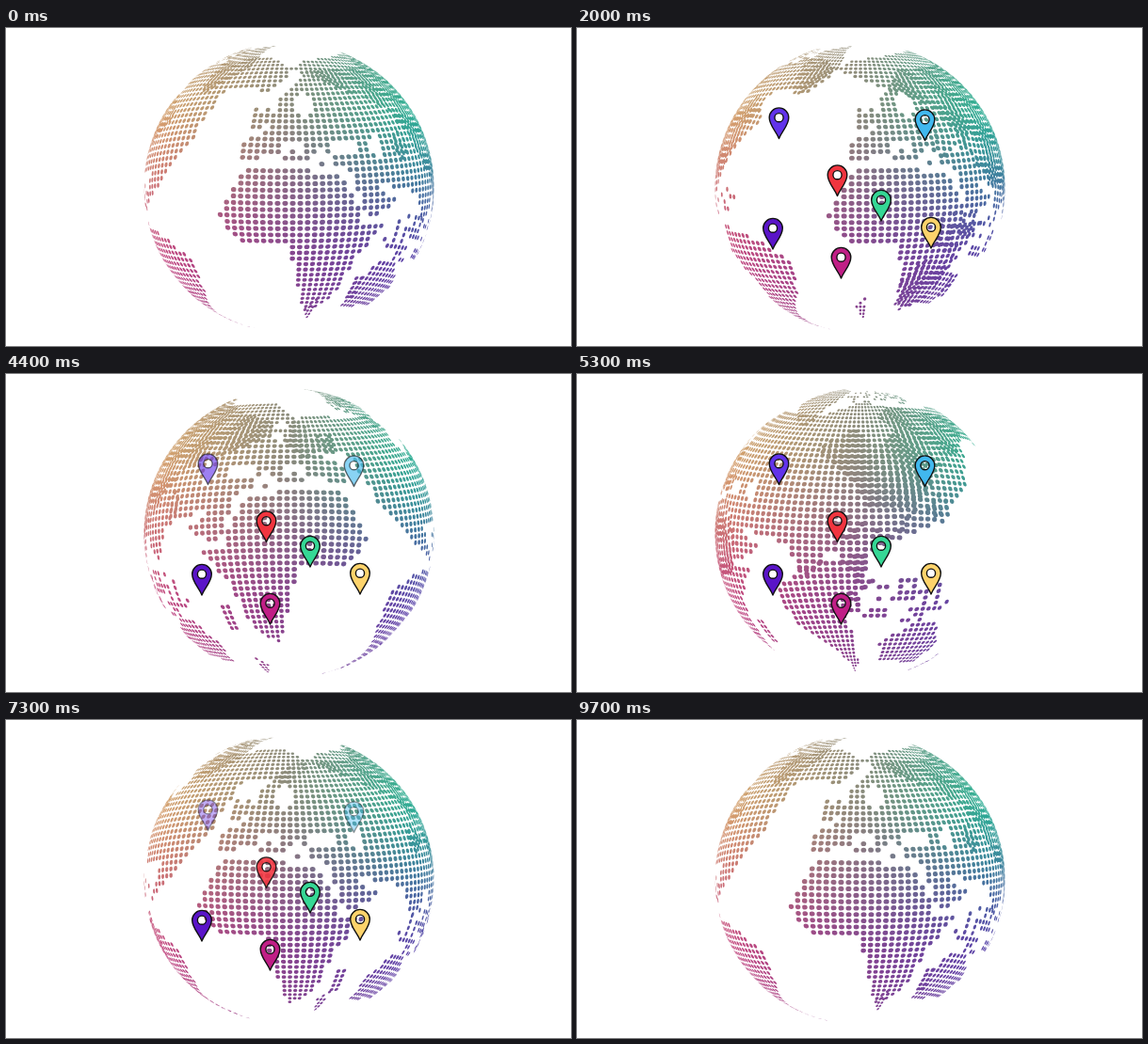
These frames come from a looping animation (600x338 px, 10000 ms). An HTML page with a canvas:

```html
<!DOCTYPE html>
<html lang="en">
<head>
<meta charset="utf-8">
<title>Dotted globe</title>
<style>
html, body { margin: 0; height: 100%; overflow: hidden; background: #fff; }
canvas { display: block; width: 100vw; height: 100vh; }
</style>
</head>
<body>
<canvas id="stage" width="600" height="338"></canvas>
<script>
const W = 600, H = 338, LOOP = 10;
const CX = 300.5, CY = 169.5, R = 154;
const COLS = 120, ROWS = 70, DOT = 0.38;
const START_LON = 11;
const rad = d => d * Math.PI / 180;
const clamp = v => Math.max(0, Math.min(1, v));
const ST = Math.sin(rad(5)), CT = Math.cos(rad(5));
const ctx = document.getElementById('stage').getContext('2d');

let seed = 7;
const random = () => (seed = seed * 16807 % 2147483647) / 2147483647;

// Miller latitude, stretched over the whole sphere
const mapLat = lat => 1.1625 / rad(1) * Math.log(Math.tan(rad(45 + 0.4 * lat))) - 21.5;

// Continents: a few coastal key points each, as longitude and latitude
const land = new Path2D();
function continent(...pts) {
  for (let i = 0; i < pts.length; i += 2) {
    land[i ? 'lineTo' : 'moveTo'](pts[i], mapLat(pts[i + 1]));
  }
  land.closePath();
}
// North America, Greenland, South America
continent(-172,65, -156,71, -95,69, -78,61, -56,52, -75,37, -81,27, -97,28, -90,17, -78,8,
  -107,22, -124,36, -136,57, -160,56);
continent(-66,79, -30,83, -20,72, -44,60);
continent(-78,9, -51,4, -35,-7, -41,-22, -66,-45, -68,-55, -75,-46, -70,-18, -81,-4);
// Africa, Eurasia, Australia
continent(-8,35, 11,36, 34,31, 43,12, 52,11, 41,-4, 36,-24, 20,-35, 13,-8, 11,4, -9,4, -19,15);
continent(-9,37, -9,44, 2,50, 5,60, 25,71, 73,71, 105,77, 180,69, 188,65, 162,57, 140,50,
  128,38, 122,30, 107,20, 104,2, 99,12, 92,22, 82,8, 72,23, 57,26, 49,30, 52,24, 59,21,
  44,13, 36,33, 27,38, 12,44, 0,39);
continent(114,-23, 131,-12, 142,-12, 153,-27, 147,-39, 116,-35);

// Inside an oval each dot is land by chance: 0 is a sea, more is an archipelago
const ovals = [];
const oval = (chance, lon, lat, rx, ry) => ovals.push({ chance, lon, lat: mapLat(lat), rx, ry });
oval(0, -85, 59, 8, 7);
oval(0, 35, 43, 6, 3);
oval(0, 51, 42, 3, 5);
oval(0, 19, 58, 4, 6);
oval(0.5, 16, 40, 13, 5);
oval(0.5, -92, 75, 32, 8);
oval(0.4, -73, 20, 11, 5);
oval(0.45, 122, -1, 25, 11);
oval(0.7, 138, 37, 6, 7);
oval(0.7, 173, -41, 5, 7);
oval(1, 47, -19, 3, 7);
oval(0.8, -3, 54, 5, 6);

const dots = [];
for (let j = 0; j < ROWS; j++) {
  const lat = -90 + (j + 0.5) * 180 / ROWS;
  for (let i = 0; i < COLS; i++) {
    const lon = -172 + (i + 0.5) * 360 / COLS;
    let solid = ctx.isPointInPath(land, lon, lat);
    for (const o of ovals) {
      if (Math.hypot((lon - o.lon) / o.rx, (lat - o.lat) / o.ry) < 1) solid = random() < o.chance;
    }
    if (solid) dots.push({ lon: rad(lon), sin: Math.sin(rad(lat)), cos: Math.cos(rad(lat)) });
  }
}

// Colour blend fixed to the stage
function makeTint() {
  const sheet = document.createElement('canvas');
  sheet.width = W;
  sheet.height = H;
  const g = sheet.getContext('2d');
  const across = (...colors) => {
    const grad = g.createLinearGradient(165, 0, 435, 0);
    colors.forEach((c, i) => grad.addColorStop(i / (colors.length - 1), c));
    return grad;
  };
  const top = across('#d6a46c', '#8c8c7c', '#2ab294');
  const bottom = across('#c2447f', '#87448f', '#5a40aa');
  for (let y = 0; y < H; y++) {
    const k = clamp((y - 65) / 200);
    g.globalAlpha = 1;
    g.fillStyle = top;
    g.fillRect(0, y, W, 1);
    g.globalAlpha = k * k * (3 - 2 * k);
    g.fillStyle = bottom;
    g.fillRect(0, y, W, 1);
  }
  return ctx.createPattern(sheet, 'no-repeat');
}
const tint = makeTint();

// One full turn on a logistic ease, at rest from 9.7 s
const TURN_END = 9.7;
const logistic = t => 1 / (1 + Math.exp(-1.22 * (t - 4.43)));
function turnAt(t) {
  const from = logistic(0), to = logistic(TURN_END);
  return 360 * (logistic(Math.min(t, TURN_END)) - from) / (to - from);
}

// Both sides of the see-through sphere, each dot flattened along the surface
function drawGlobe(t) {
  const shift = rad(turnAt(t) - START_LON);
  const rx = R * DOT * 2 * Math.PI / COLS, ry = R * DOT * Math.PI / ROWS;
  ctx.beginPath();
  for (const { lon, sin, cos } of dots) {
    const sa = Math.sin(lon + shift), ca = Math.cos(lon + shift);
    const depth = sin * ST + cos * ca * CT;
    ctx.setTransform(
      rx * cos * ca, -rx * cos * sa * ST,
      -ry * sin * sa, -ry * (cos * CT + sin * ca * ST),
      CX + R * cos * sa, CY - R * (sin * CT - cos * ca * ST));
    ctx.moveTo(1, 0);
    ctx.arc(0, 0, 1, 0, 2 * Math.PI, depth < 0);
  }
  ctx.setTransform(1, 0, 0, 1, 0, 0);
  ctx.fillStyle = tint;
  ctx.fill();
}

const PIN_CYCLE = 3, CYCLES = 3, FADE = 0.45, STAGGER = 0.22;
const pinBody = new Path2D('M0 0C-3-8-10.3-14-10.3-22.3A10.3 10.3 0 0 1 10.3-22.3C10.3-14 3-8 0 0Z' +
  'M4.6-22.3A4.6 4.6 0 1 0-4.6-22.3A4.6 4.6 0 1 0 4.6-22.3Z');

// Pins by tip position; order is the turn in which they fade in
const pins = [
  { x: 280.5, y: 266, color: '#c01f86', order: 0 },
  { x: 208, y: 235, color: '#5a14c8', order: 1 },
  { x: 376, y: 234, color: '#fdd36b', order: 2 },
  { x: 323, y: 205, color: '#35d795', order: 3 },
  { x: 276.5, y: 178.5, color: '#f0353f', order: 4 },
  { x: 369.5, y: 119.5, color: '#41b8ee', order: 5 },
  { x: 214.5, y: 117.5, color: '#6233ea', order: 5 }
];

function drawPins(t) {
  if (t >= CYCLES * PIN_CYCLE) return;
  const phase = t % PIN_CYCLE;
  ctx.strokeStyle = '#111';
  ctx.lineWidth = 1.4;
  ctx.lineJoin = 'round';
  for (const { x, y, color, order } of pins) {
    const fadeIn = clamp((phase - 0.02 - STAGGER * order) / FADE);
    const fadeOut = clamp((PIN_CYCLE - phase) / FADE);
    ctx.globalAlpha = Math.min(fadeIn, fadeOut);
    ctx.setTransform(1, 0, 0, 1, x, y);
    ctx.fillStyle = color;
    ctx.fill(pinBody, 'evenodd');
    ctx.stroke(pinBody);
  }
  ctx.setTransform(1, 0, 0, 1, 0, 0);
  ctx.globalAlpha = 1;
}

function frame() {
  const t = performance.now() / 1000 % LOOP;
  ctx.clearRect(0, 0, W, H);
  drawGlobe(t);
  drawPins(t);
  requestAnimationFrame(frame);
}
frame();
</script>
</body>
</html>
```
